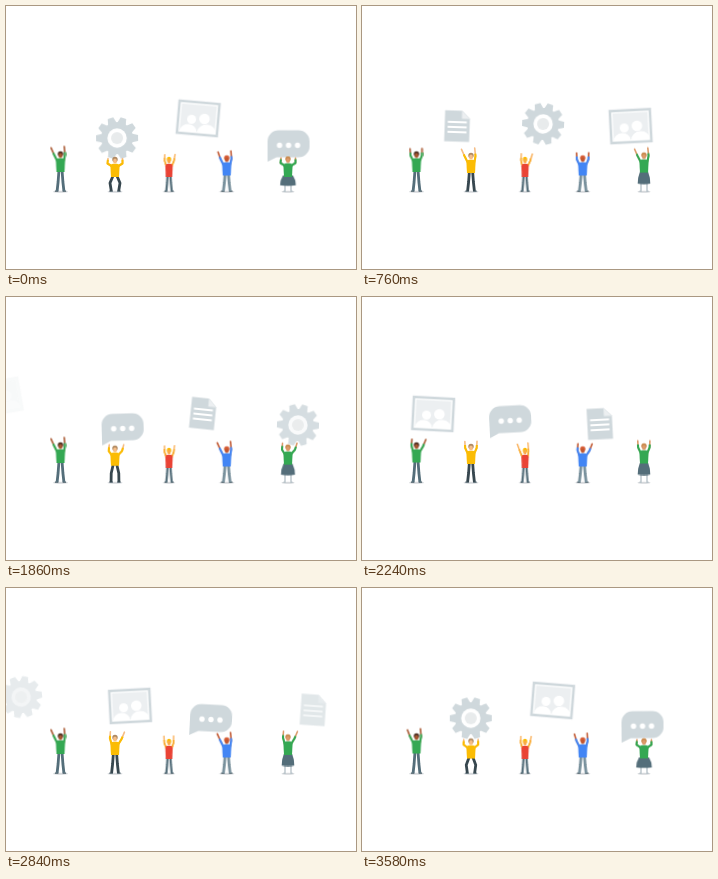
Animation of 350x263 px, one loop 3.6 s. Source, as an HTML page without scripts:

```html
<!DOCTYPE html>
<html lang="en">
<head>
<meta charset="utf-8">
<title>Passing it along</title>
<style>
@property --x { syntax: "<length>"; inherits: false; initial-value: 0px; }
@property --y { syntax: "<length>"; inherits: false; initial-value: 0px; }
@property --tilt { syntax: "<angle>"; inherits: false; initial-value: 0deg; }

html, body { margin: 0; width: 100%; height: 100%; overflow: hidden; background: #fff; }
svg { display: block; width: 100vw; height: 100vh; }

/* Thrown items share one route, a quarter loop apart. */
.item {
  fill: #cfd8dc;
  transform: translate(var(--x), var(--y)) rotate(var(--tilt));
  animation: travel 3.6s linear infinite, hop 3.6s linear infinite, sway 3.6s linear infinite;
  animation-delay: var(--delay);
}
.item > * { animation: fade 3.6s linear infinite; animation-delay: var(--delay); }
.white { fill: #fff; }
.pale { fill: #eceff1; }

@keyframes travel {
  0% { --x: -22px }
  3.9% { --x: 15px }
  10% { --x: 63px }
  12.2% { --x: 71px }
  21.1% { --x: 95px }
  25% { --x: 111px }
  28.9% { --x: 124px }
  35% { --x: 140px }
  37.2% { --x: 148px }
  46.1% { --x: 181px }
  51.7% { --x: 197px }
  53.9% { --x: 205px }
  60% { --x: 230px }
  71.1% { --x: 268.5px }
  75% { --x: 282.4px }
  76.7% { --x: 292px }
  78.9% { --x: 307px }
  85% { --x: 355px }
  100% { --x: 400px }
}
@keyframes hop {
  0% { --y: 112px }
  1.7% { --y: 118px }
  3.9% { --y: 128px }
  6.9% { --y: 141px }
  8.6% { --y: 145px }
  10% { --y: 142px }
  12.2% { --y: 135px }
  16.7% { --y: 131px }
  21.1% { --y: 136px }
  22.8% { --y: 141px }
  24.4% { --y: 149px }
  25.6% { --y: 153px }
  26.7% { --y: 144px }
  28.9% { --y: 136px }
  32.8% { --y: 131px }
  35% { --y: 131px }
  37.2% { --y: 136px }
  39.7% { --y: 144px }
  41.9% { --y: 153px }
  43.3% { --y: 146px }
  46.1% { --y: 137px }
  49.7% { --y: 130px }
  51.7% { --y: 132.5px }
  53.9% { --y: 144px }
  56.7% { --y: 156px }
  58.9% { --y: 162px }
  60% { --y: 160px }
  62.2% { --y: 143px }
  64.7% { --y: 135px }
  67.5% { --y: 131px }
  71.1% { --y: 138px }
  74.4% { --y: 150.5px }
  75.6% { --y: 153px }
  76.7% { --y: 147px }
  78.9% { --y: 138px }
  85% { --y: 120px }
  100% { --y: 112px }
}
@keyframes sway {
  0% { --tilt: -12deg }
  3.9% { --tilt: -7deg }
  10% { --tilt: 0deg }
  12.2% { --tilt: 3deg }
  16.7% { --tilt: 5deg }
  21.1% { --tilt: 2deg }
  28.9% { --tilt: -3deg }
  34.2% { --tilt: -5deg }
  37.2% { --tilt: -3deg }
  43.3% { --tilt: 1deg }
  51.7% { --tilt: 6deg }
  53.9% { --tilt: 3deg }
  62.2% { --tilt: -3deg }
  66.7% { --tilt: -5deg }
  71.1% { --tilt: -3deg }
  75% { --tilt: 0deg }
  78.9% { --tilt: 4deg }
  85%, 100% { --tilt: 7deg }
}
@keyframes fade {
  0% { opacity: 0 }
  1.7% { opacity: .15 }
  3.9% { opacity: .5 }
  7%, 75.5% { opacity: 1 }
  78.9% { opacity: .62 }
  85% { opacity: .1 }
  86%, 100% { opacity: 0 }
}

/* Each person catches and throws four times per loop; 0% is the deepest crouch. */
.upper { transform: translateY(var(--head)); }
.dip, .arms, .legs, .skirt {
  animation: dip .9s linear infinite;
  animation-delay: var(--delay);
}
.arms, .legs { fill: none; stroke-linejoin: round; }
.arms {
  animation-name: reach;
  d: path("M-3.5,6 L-6.5,0 L-9.5,-6.7 M3.5,6 L4.5,0 L3.7,-8");
  stroke: var(--skin);
  stroke-width: 1.6;
  stroke-linecap: round;
}
.sleeve { stroke: var(--sleeve, var(--top)); stroke-width: 2.1; stroke-dasharray: 8.5 99; stroke-linecap: butt; }
.legs {
  animation-name: bend;
  d: path("M-1.6,-21 L-2.4,-10 L-3.4,-1 M1.6,-21 L2.4,-10 L3.4,-1");
  stroke: var(--pants);
  stroke-width: 2.8;
  transform: scaleY(var(--leg));
}
.skirt { animation-name: flare; fill: #546e7a; transform-origin: 0 16px; }
.shadow { fill: #d5d8db; }

@keyframes dip {
  0%, 97%, 100% { transform: translateY(4px) }
  6% { transform: translateY(1px) }
  10%, 83% { transform: translateY(0) }
  90% { transform: translateY(1.5px) }
}
@keyframes flare {
  0%, 97%, 100% { transform: scale(1.25, .82) }
  10%, 85% { transform: scale(1, 1) }
}
@keyframes bend {
  0%, 97%, 100% { d: path("M-1.6,-17 L-5,-9 L-3.7,-1 M1.6,-17 L5,-9 L3.7,-1") }
  6% { d: path("M-1.6,-20 L-3.4,-10 L-4,-1 M1.6,-20 L3.4,-10 L4,-1") }
  12%, 83% { d: path("M-1.6,-21 L-2.4,-10 L-3.4,-1 M1.6,-21 L2.4,-10 L3.4,-1") }
}
@keyframes reach {
  0%, 97%, 100% { d: path("M-3.5,6 L-7.5,3.5 L-7,-1.5 M3.5,6 L7.5,3.5 L7.5,-1.5") }
  5.6% { d: path("M-3.5,6 L-6,2 L-5.5,-4.5 M3.5,6 L7,2 L9,-4.5") }
  14.4% { d: path("M-3.5,6 L-5,0 L-4.5,-6.3 M3.5,6 L6.5,1 L9.5,-6") }
  39% { d: path("M-3.5,6 L-5.5,1 L-5.5,-5 M3.5,6 L6,1 L7,-5.2") }
  51% { d: path("M-3.5,6 L-6,1 L-6.5,-5.8 M3.5,6 L5.5,1 L5.5,-6") }
  67%, 83% { d: path("M-3.5,6 L-6.5,0 L-9.5,-6.7 M3.5,6 L4.5,0 L3.7,-8") }
}

.doc { --delay: 0s; }
.gear { --delay: -.9s; }
.photo { --delay: -1.8s; }
.chat { --delay: -2.7s; }

.ann { --delay: -.6s; --head: -37.5px; --leg: 1; --top: #34a853; --pants: #546e7a; --skin: #a8562f; --hair: #4e2f22; }
.ben { --delay: -.88s; --head: -36px; --leg: 1; --top: #fbbc04; --pants: #37474f; --skin: #f5bd86; --hair: #b08a63; }
.cat { --delay: -.3s; --head: -32px; --leg: .9; --top: #ea4335; --pants: #546e7a; --skin: #f9a94b; --hair: #fbbc04; --sleeve: #f9ab2f; }
.dan { --delay: -.565s; --head: -33.5px; --leg: .9; --top: #4285f4; --pants: #78909c; --skin: #c0562f; --hair: #d9603a; }
.eve { --delay: -.89s; --head: -36.5px; --top: #34a853; --skin: #dc9a6a; --hair: #c98a4e; }
</style>
</head>
<body>
<svg viewBox="0 0 350 263" preserveAspectRatio="none">
  <defs>
    <path id="teeth" d="M-4.6,-14 L-2.9,-21 H2.9 L4.6,-14 V14 L2.9,21 H-2.9 L-4.6,14Z"/>
    <clipPath id="print"><rect x="-17.5" y="-13.5" width="35" height="27"/></clipPath>
    <g id="feet">
      <ellipse class="shadow" cy="-.2" rx="7.5" ry="1"/>
      <path d="M-5.6,-.8 H-2.2 M2.2,-.8 H5.6" stroke="#455a64" stroke-width="1.2"/>
    </g>
    <g id="bust">
      <path d="M-4.6,6.5 Q-4.4,4 -2,3.8 H2 Q4.4,4 4.6,6.5 L4,17 H-4Z" fill="var(--top)"/>
      <circle cy="-.6" r="2.7" fill="var(--hair)"/>
      <ellipse cy="1" rx="1.9" ry="2.5" fill="var(--skin)"/>
    </g>
  </defs>

  <g transform="translate(0 -16)">
    <g class="item doc">
      <path d="M-12.5,-15.5 H4.5 L12.5,-7.5 V15.5 H-12.5Z"/>
      <path class="pale" d="M4.5,-15.5 L12.5,-7.5 H4.5Z"/>
      <path d="M-9.5,-4 H9.5 M-9.5,1 H9.5 M-9.5,6 H9.5" stroke="#fff" stroke-width="2"/>
    </g>
  </g>
  <g transform="translate(0 -19)">
    <g class="item gear">
      <g>
        <circle r="16"/>
        <use href="#teeth" transform="rotate(18)"/>
        <use href="#teeth" transform="rotate(54)"/>
        <use href="#teeth" transform="rotate(90)"/>
        <use href="#teeth" transform="rotate(126)"/>
        <use href="#teeth" transform="rotate(162)"/>
      </g>
      <circle class="white" r="9.7"/>
      <circle r="6" fill="#e8ebec"/>
    </g>
  </g>
  <g transform="translate(0 -18)">
    <g class="item photo">
      <rect x="-21.3" y="-17.3" width="42.6" height="34.6"/>
      <rect class="white" x="-18.7" y="-14.7" width="37.4" height="29.4"/>
      <g clip-path="url(#print)">
        <rect class="pale" x="-17.5" y="-13.5" width="35" height="27"/>
        <g class="white">
          <circle cx="-6.5" cy="1.5" r="4.5"/>
          <circle cx="6.3" cy="0" r="5.3"/>
          <ellipse cx="-9" cy="14" rx="8.5" ry="7.5"/>
          <ellipse cx="9.5" cy="14" rx="9.5" ry="8.5"/>
        </g>
      </g>
    </g>
  </g>
  <g transform="translate(0 -14)">
    <g class="item chat">
      <path d="M-10,-13.5 H10 A11,11 0 0 1 21,-2.5 V2.5 A11,11 0 0 1 10,13.5 H-12 L-21,18 V-2.5 A11,11 0 0 1 -10,-13.5Z"/>
      <g class="white">
        <circle cx="-9" cy="1.5" r="2.7"/>
        <circle cy="1.5" r="2.7"/>
        <circle cx="9" cy="1.5" r="2.7"/>
      </g>
    </g>
  </g>

  <g class="ann" transform="translate(54.5 186)">
    <use href="#feet"/><path class="legs"/>
    <g class="upper"><g class="dip"><path class="arms"/><path class="arms sleeve"/><use href="#bust"/></g></g>
  </g>
  <g class="ben" transform="translate(109 186)">
    <use href="#feet"/><path class="legs"/>
    <g class="upper"><g class="dip"><path class="arms"/><path class="arms sleeve"/><use href="#bust"/></g></g>
  </g>
  <g class="cat" transform="translate(163 186) scale(.8 1)">
    <use href="#feet"/><path class="legs"/>
    <g class="upper"><g class="dip"><path class="arms"/><path class="arms sleeve"/><use href="#bust"/></g></g>
  </g>
  <g class="dan" transform="translate(220.7 186)">
    <use href="#feet"/><path class="legs"/>
    <g class="upper"><g class="dip"><path class="arms"/><path class="arms sleeve"/><use href="#bust"/></g></g>
  </g>
  <g class="eve" transform="translate(282 186)">
    <ellipse class="shadow" cy="-.2" rx="6.5" ry="1"/>
    <path d="M-3,-10 V-.8 H-4.5 M3,-10 V-.8 H4.5" fill="none" stroke="#b9c4ca" stroke-width="1.4"/>
    <g class="upper"><g class="dip">
      <path class="skirt" d="M-4,16 H4 Q6.5,22 6.3,28 Q0,29.5 -6.3,28 Q-6.5,22 -4,16Z"/>
      <path class="arms"/><path class="arms sleeve"/><use href="#bust"/>
    </g></g>
  </g>
</svg>
</body>
</html>
```
